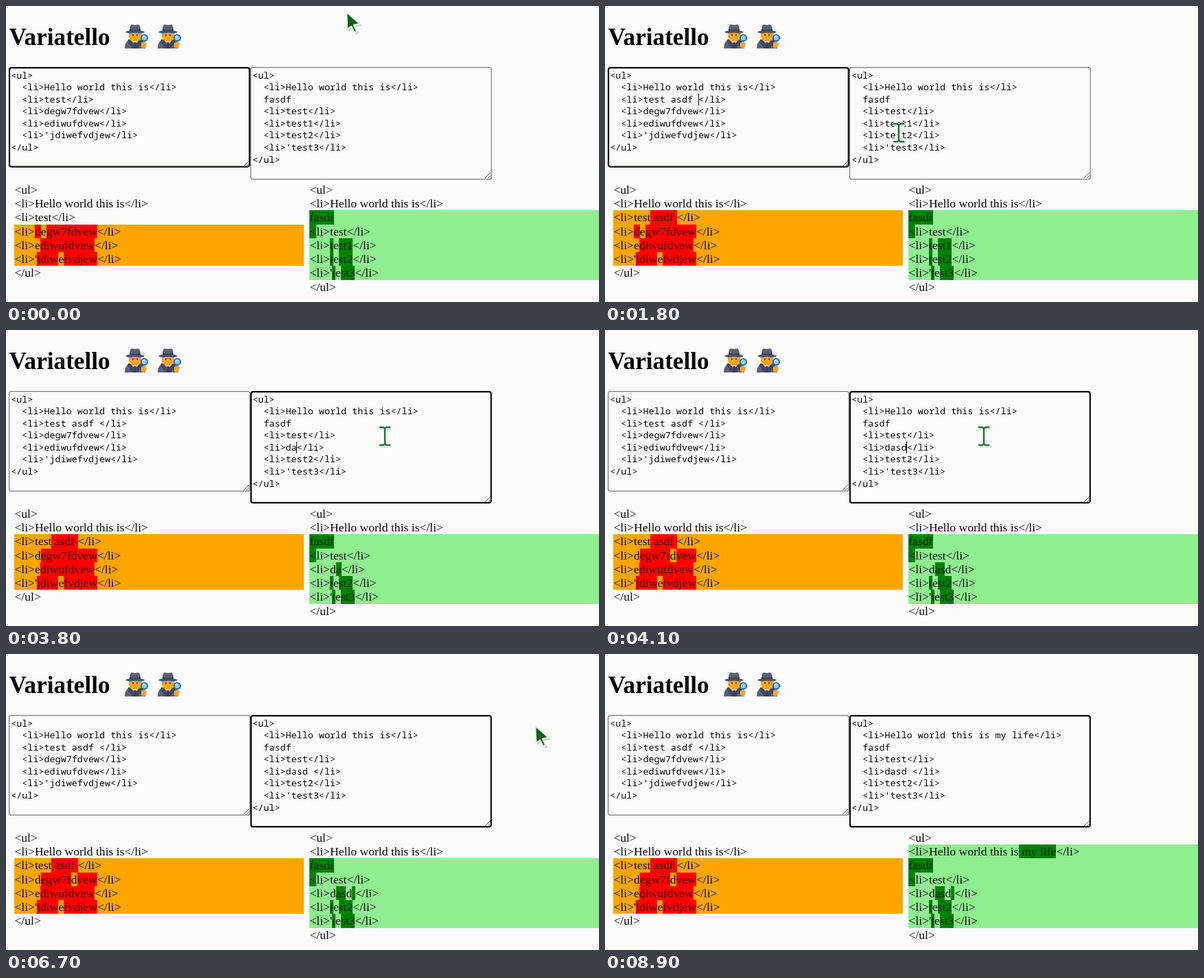
An HTML page that plays this animation: 864x432 px, repeating every 9 s.

```html
<!DOCTYPE html>
<html lang="en">
<head>
<meta charset="utf-8">
<title>Text comparison</title>
<style>
html, body { margin: 0; width: 100%; height: 100%; overflow: hidden; background: #fcfdfb; }
#stage { position: relative; width: 864px; height: 432px; overflow: hidden; color: #080808; }
#stage > * { position: absolute; margin: 0; white-space: pre; }
svg { left: 0; top: 0; }
h1 { left: 4.4px; top: 26px; font: bold 35.2px/40px "Liberation Serif", "Times New Roman", serif; }
.code { top: 92.5px; font: 13.43px/17.6px "Noto Sans Mono", "DejaVu Sans Mono", monospace; }
.code div { height: 17.6px; }
.code b { display: inline-block; font-weight: normal; color: #fff; background: #2f62c6; }
.diff { top: 257.8px; font: 17.6px/20.25px "Liberation Serif", "Times New Roman", serif; }
.diff div { height: 20.25px; }
.diff b { display: inline-block; height: 20.25px; font-weight: normal; color: rgba(0, 0, 0, .74); }
#oldDiff { left: 12.4px; width: 421.5px; }
#oldDiff .bar { background: #ffa500; }
#oldDiff b { background: #f00; }
#newDiff { left: 442.4px; width: 421.5px; }
#newDiff .bar { background: #8fee90; }
#newDiff b { background: #008000; }
#caret { width: 1.1px; height: 17.6px; background: #000; }
</style>
</head>
<body>
<div id="stage">
  <svg width="864" height="432" fill="none">
    <defs>
      <g id="sleuth">
        <path d="M1 36Q1 25 9 23L16 27 23 23Q31 25 31 36Z" fill="#5b6078"/>
        <path d="M10 22L16 27 22 22 19 29 16 33 13 29Z" fill="#c9cbd6"/>
        <path d="M14.5 27H17.5L18.5 36H13.5Z" fill="#3a3d50"/>
        <path d="M7 22L16 30 12 36 5 25ZM25 22L16 30 20 36 27 25Z" fill="#44485d"/>
        <path d="M7 12H25V18Q24 26 16 26 8 26 7 18Z" fill="#f2a52c"/>
        <path d="M12 16.5h2M18 16.5h2" stroke="#46352c" stroke-width="2"/>
        <path d="M8 10Q8 1 12 1 16 2.5 20 1 24 1 24 10Z" fill="#5a5f76"/>
        <path d="M8 7.5Q16 10 24 7.5V11H8Z" fill="#34374a"/>
        <path d="M2 12Q5 9 16 9.5 27 9 30 12 27 15 16 13 5 15 2 12Z" fill="#4b5066"/>
        <path d="M29 25V35" stroke="#69757c" stroke-width="2.6"/>
        <circle cx="29.500" cy="20.500" r="4.600" fill="#8fd0f5" stroke="#2f6e9b" stroke-width="2"/>
        <path d="M27 19Q28 17.500 30 17.500" stroke="#fff"/>
        <path d="M25 28Q29 25 33 28L32 34Q28 37 25 34Z" fill="#f2a52c"/>
      </g>
    </defs>
    <use href="#sleuth" x="172" y="26"/>
    <use href="#sleuth" x="220" y="26"/>
    <rect id="oldBox" rx="3"/>
    <rect id="newBox" rx="3"/>
    <path d="M346 234l8-8M350.500 234l3.500-3.500M698 251l8-8M702.500 251l3.500-3.500" stroke="#555"/>
  </svg>
  <h1>Variatello</h1>
  <div class="code" id="oldCode" style="left:7.200px"></div>
  <div class="code" id="newCode" style="left:359.200px"></div>
  <div class="diff" id="oldDiff"></div>
  <div class="diff" id="newDiff"></div>
  <div id="caret"></div>
  <svg width="864" height="432" fill="none">
    <g id="arrow" stroke-linejoin="round">
      <path d="M2 3L3 29 9 24 14 33 18 31 13 22 23 20Z" fill="#000" opacity=".22"/>
      <path d="M0 0L1 26 7 21.500 11.500 30.500 15.500 28.500 11 19.500 20 17.500Z" fill="#08640f" stroke="#edf1ed" stroke-width="2.600"/>
    </g>
    <g id="beam">
      <path d="M-8-13H-2L0-11 2-13H8M0-11V11M-8 13H-2L0 11 2 13H8" stroke="#cbd3cc" stroke-width="5" transform="translate(1 1)"/>
      <path d="M-8-13H-2L0-11 2-13H8M0-11V11M-8 13H-2L0 11 2 13H8" stroke="#fff" stroke-width="5"/>
      <path d="M-8-13H-2L0-11 2-13H8M0-11V11M-8 13H-2L0 11 2 13H8" stroke="#1c7033" stroke-width="2.400"/>
    </g>
  </svg>
</div>
<script>
const LOOP = 9000, CHAR = 8.06, ROW = 17.6, BLINK = 338;
const FOCUS = 2100, SELECT = 2250, REPLACE = 3100, CLICK = 6350;
const $ = id => document.getElementById(id);

const typing = {
  oldWord: [" asdf ", [400, 600, 700, 800, 900, 1100]],
  newWord: ["dasd ", [REPLACE, 3800, 3900, 4100, 4120]],
  ending: [" my life", [7100, 7200, 7300, 7400, 7600, 7700, 7750, 7800]]
};
// Each reset makes the caret visible and restarts its blinking.
const caretResets = [100, FOCUS, CLICK, 7850, ...Object.values(typing).flatMap(k => k[1])].sort((a, b) => a - b);

const pointerPath = [
  [0, 496, 8.5], [1350, 496, 8.5], [1780, 428, 185], [2000, 428, 185], [2150, 428, 174],
  [2300, 428, 174], [2700, 552, 155], [5850, 552, 155], [6200, 562, 120],
  [CLICK, 562, 120], [6500, 771, 104.5], [7950, 771, 104.5], [8300, 768, -42], [LOOP, 768, -42]
];

const typed = (name, t) => {
  const [text, times] = typing[name];
  return text.slice(0, times.filter(at => at <= t).length);
};
const mark = s => s ? `[${s}]` : "";
const item = s => `<li>${s}</li>`;
const list = rows => ["<ul>", ...rows, "</ul>"];

// Square brackets enclose highlighted runs.
function setRows(id, rows) {
  const html = rows.map(row => {
    const runs = row.split(/[\[\]]/).map((s, i) => {
      const safe = s.replace(/</g, "&lt;");
      return i % 2 ? `<b>${safe}</b>` : safe;
    });
    return `<div${runs.length > 1 ? ' class="bar"' : ""}>${runs.join("")}</div>`;
  }).join("");
  const el = $(id);
  if (el.shown !== html) el.innerHTML = el.shown = html;
}

function setBox(id, x, height, focused) {
  const attrs = {
    x: x + (focused ? .4 : 0), y: focused ? 90.2 : 89.6,
    width: focused ? 349.8 : 350.6, height: focused ? height - 1.2 : height,
    stroke: focused ? "#0b0b0b" : "#787878", "stroke-width": focused ? 2.2 : 1.2
  };
  for (const key in attrs) $(id).setAttribute(key, attrs[key]);
}

function pointerAt(t) {
  const i = pointerPath.findIndex(p => p[0] > t);
  const [t0, x0, y0] = pointerPath[i - 1], [t1, x1, y1] = pointerPath[i];
  const u = (t - t0) / (t1 - t0), e = u * u * (3 - 2 * u);
  return [x0 + (x1 - x0) * e, y0 + (y1 - y0) * e];
}

function drawPointer(t) {
  const [x, y] = pointerAt(t);
  const overText = y > 90 && y < 253 && x > 5 && x < 707;
  for (const id of ["arrow", "beam"]) {
    $(id).setAttribute("transform", `translate(${x} ${y})`);
    $(id).style.display = (id === "beam") === overText ? "" : "none";
  }
}

function drawCaret(t, oldWord, newWord, ending) {
  const since = t - (caretResets.filter(at => at <= t).pop() ?? caretResets[0]);
  const selecting = t >= SELECT && t < REPLACE;
  const onRight = t >= FOCUS;
  let col = 10 + oldWord.length, row = 2;
  if (t >= CLICK) [col, row] = [25 + ending.length, 1];
  else if (onRight) [col, row] = [6 + (t < REPLACE ? 3 : newWord.length), 4];
  const style = $("caret").style;
  style.left = (onRight ? 359.2 : 7.2) + col * CHAR - .5 + "px";
  style.top = 92.5 + row * ROW + "px";
  style.display = selecting || Math.floor(since / BLINK) % 2 ? "none" : "";
}

function draw(t) {
  const oldWord = typed("oldWord", t), newWord = typed("newWord", t), ending = typed("ending", t);
  const hello = "Hello world this is";
  const field = newWord || (t >= SELECT ? "[test1]" : "test1");

  setBox("oldBox", 4.6, 145.6, t < FOCUS);
  setBox("newBox", 356.6, 163.2, t >= FOCUS);
  const indent = s => "  " + s;
  setRows("oldCode", list([hello, "test" + oldWord, "degw7fdvew", "ediwufdvew", "'jdiwefvdjew"].map(item).map(indent)));
  setRows("newCode", list([item(hello + ending), "fasdf", ...["test", field, "test2", "'test3"].map(item)].map(indent)));

  const second = newWord.length > 3 ? "d[egw7f]d[vew]" : newWord ? "d[egw7fdvew]" : "[d]e[gw7fdvew]";
  const changed = newWord
    ? "d" + mark(newWord.slice(1, 3)) + newWord.slice(3, 4) + mark(newWord.slice(4))
    : "[t]e[st1]";
  setRows("oldDiff", list([hello, "test" + mark(oldWord), second, "e[diwufdvew]", "'[jdiw]e[fvdjew]"].map(item)));
  setRows("newDiff", list([item(hello + mark(ending)), "[fasdf]", "[<]li>test</li>",
    ...[changed, "[t]e[st2]", "'[t]e[st3]"].map(item)]));

  drawCaret(t, oldWord, newWord, ending);
  drawPointer(t);
}

const start = performance.now();
function tick() {
  draw((performance.now() - start) % LOOP);
  requestAnimationFrame(tick);
}
tick();
</script>
</body>
</html>
```
